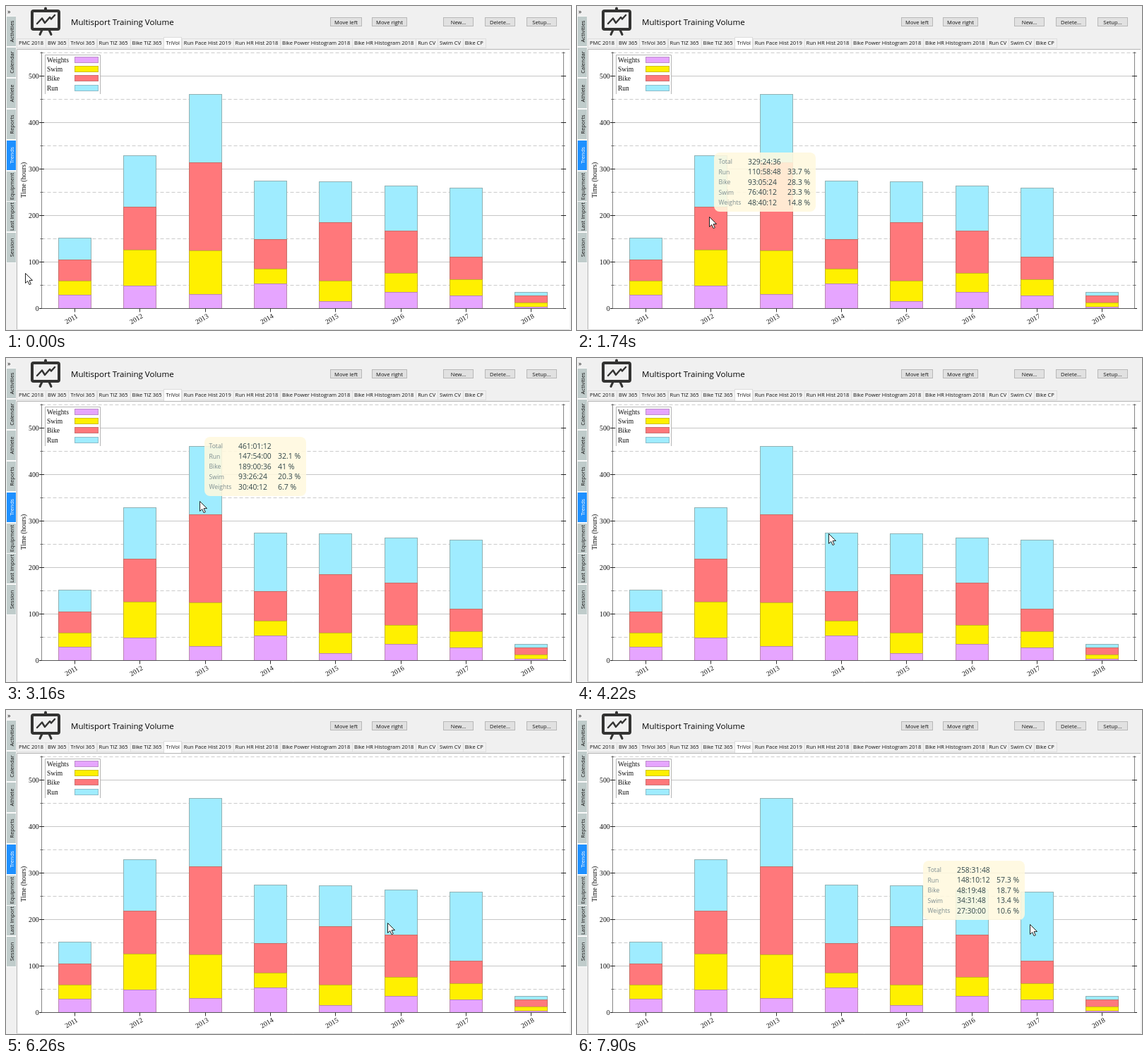
These frames come from a looping animation (800x460 px, 7.99 s). An HTML page with a canvas:

```html
<!DOCTYPE html>
<html lang="en">
<head>
<meta charset="utf-8">
<title>Training volume</title>
<style>
  html, body { margin: 0; width: 100%; height: 100%; overflow: hidden; background: #f0f0f0; }
  canvas { display: block; width: 800px; height: 460px; }
</style>
</head>
<body>
<canvas id="stage" width="800" height="460"></canvas>
<script>
const LOOP = 7990;
const STEP = 78; // the pointer is redrawn at this interval, in ms
const SANS = '"Open Sans", "Noto Sans", sans-serif';
const SERIF = '"Liberation Serif", serif';
const ctx = document.getElementById('stage').getContext('2d');

// Hours per year, in the order of SPORTS; bars and tooltips both come from these
const SPORTS = ['Run', 'Bike', 'Swim', 'Weights'];
const COLORS = ['#9fecff', '#ff787b', '#fff000', '#e6a5ff'];
const YEARS = [
  [47.09, 45.84, 30.33, 29.00],
  [110.98, 93.09, 76.67, 48.67],
  [147.90, 189.01, 93.44, 30.67],
  [125.06, 63.67, 31.75, 53.76],
  [88.17, 126.14, 43.68, 15.08],
  [96.81, 91.64, 40.59, 34.42],
  [148.17, 48.33, 34.53, 27.50],
  [7.1, 15.2, 8.3, 3.7]
];
const LEFT = 50.5, RIGHT = 789.5, BASE = 429.5, BAR = 46;
const sum = list => list.reduce((a, b) => a + b, 0);
const yOf = hours => BASE - hours * 0.66;
const rowOf = hours => Math.floor(yOf(hours));
const barX = i => 74 + i * 92.35;

// One glide per stop: start, end, where it stops, and how far it sags on the way
const START = { x: 27, y: 379 };
const GLIDES = [
  { start: 100, end: 800, x: 108, y: 378, sag: 12 },
  { start: 1230, end: 1740, x: 187, y: 299, sag: 0 },
  { start: 2200, end: 2990, x: 274, y: 203, sag: 0 },
  { start: 3300, end: 4080, x: 346, y: 239, sag: 0 },
  { start: 4160, end: 4530, x: 366, y: 250, sag: 6 },
  { start: 4910, end: 5690, x: 463, y: 275, sag: 9 },
  { start: 5930, end: 6720, x: 559, y: 294, sag: 12 },
  { start: 7260, end: 7900, x: 641, y: 304, sag: 3 }
];

// Glides settle early, so the ease ends before the sag does
function ease(p) {
  const q = Math.min(1, p * 1.7);
  return q * q * (3 - 2 * q);
}

// Pointer place, seen `lag` steps late
function pointerAt(t, lag) {
  const n = GLIDES.findLastIndex(g => t >= g.start);
  if (n < 0) return START;
  const from = GLIDES[n - 1] || START, to = GLIDES[n];
  const steps = Math.floor((t - to.start) / STEP + 0.25) + 0.7 - lag;
  const p = Math.min(1, steps * STEP / (to.end - to.start + STEP));
  const f = ease(p);
  return {
    x: Math.round(from.x + (to.x - from.x) * f),
    y: Math.round(from.y + (to.y - from.y) * f + to.sag * Math.sin(Math.PI * p) * (p < 0.9))
  };
}

function box(x, y, w, h, fill, stroke) {
  ctx.fillStyle = fill;
  ctx.fillRect(x, y, w, h);
  if (!stroke) return;
  ctx.strokeStyle = stroke;
  ctx.lineWidth = 1;
  ctx.strokeRect(x + 0.5, y + 0.5, w - 1, h - 1);
}

function line(points, color, width = 1) {
  ctx.strokeStyle = color;
  ctx.lineWidth = width;
  ctx.beginPath();
  points.forEach(([x, y]) => ctx.lineTo(x, y));
  ctx.stroke();
}

function widthOf(str, size) {
  ctx.font = `${size}px ${SANS}`;
  return ctx.measureText(str).width;
}

function text(str, x, y, size, { font = SANS, color = '#111', align = 'left', turn = 0 } = {}) {
  ctx.save();
  ctx.translate(x, y);
  ctx.rotate(turn);
  ctx.font = `${size}px ${font}`;
  ctx.fillStyle = color;
  ctx.textAlign = align;
  ctx.fillText(str, 0, 0);
  ctx.restore();
}

function drawIcon() {
  const ink = '#333332', mid = 56;
  ctx.save();
  ctx.lineJoin = ctx.lineCap = 'round';
  line([[mid, 3.5], [mid, 6]], ink, 4);
  for (const side of [-1, 1]) line([[mid + side * 5, 34], [mid + side * 8, 40.5]], ink, 3);
  line([[44, 25], [51, 17.5], [55, 24], [62, 16], [64, 18.5], [69, 13]], ink, 2.4);
  ctx.lineWidth = 4;
  ctx.beginPath();
  ctx.roundRect(mid - 19, 7, 38, 26, 2);
  ctx.stroke();
  ctx.restore();
}

function drawButtons(x, labels) {
  for (const label of labels) {
    const w = Math.round(Math.max(43, widthOf(label, 7.6) + 12));
    box(x, 16, w, 13, '#e1e1e1', '#b8b8b8');
    text(label, x + w / 2, 25.5, 7.6, { align: 'center' });
    x += 59;
  }
}

function drawHeader() {
  drawIcon();
  text('Multisport Training Volume', 92, 26.5, 11.55, { color: '#000' });
  drawButtons(459, ['Move left', 'Move right']);
  drawButtons(619, ['New...', 'Delete...', 'Setup...']);
}

function drawTabs() {
  const names = ['PMC 2018', 'BW 365', 'TriVol 365', 'Run TIZ 365', 'Bike TIZ 365', 'TriVol',
    'Run Pace Hist 2019', 'Run HR Hist 2018', 'Bike Power Histogram 2018',
    'Bike HR Histogram 2018', 'Run CV', 'Swim CV', 'Bike CP'];
  let x = 18;
  for (const name of names) {
    const w = widthOf(name, 7.5) + 5.86, left = Math.round(x) - 3;
    if (name === 'TriVol') box(left, 44, Math.round(w) + 1, 18, '#fff', '#dcdcdc');
    else box(left, 46, Math.round(w) + 1, 14, '#f0f0f0', '#dedede');
    text(name, x, 55, 7.5);
    x += w;
  }
}

function drawSidebar() {
  text('»', 2, 11, 9);
  const names = ['Activities', 'Calendar', 'Athlete', 'Reports', 'Trends', 'Equipment', 'Last Import', 'Session'];
  names.forEach((name, i) => {
    const y = Math.round(15 + i * 43.9), on = name === 'Trends';
    box(0, y - 1, 14, 44, '#fafafa');
    box(1, y, 13, 42, on ? '#1e90ff' : '#c0cccb');
    text(name, 10.5, y + 21, 7.5, { align: 'center', turn: -Math.PI / 2, color: on ? '#fff' : '#111' });
  });
}

function drawPanel() {
  box(15, 61, 783, 399, '#fff');
  line([[15.5, 460], [15.5, 61.5], [798, 61.5]], '#b4b4b4');
  line([[15, 459.5], [798, 459.5]], '#d8d8d8');
}

// Calls back for every 50 hours with its line and whether it is a main one
function eachLevel(first, fn) {
  for (let h = first; h <= 550; h += 50) fn(h, rowOf(h) + 0.5, h % 100 === 0);
}

function drawGrid() {
  eachLevel(50, (h, y, main) => {
    ctx.setLineDash(main ? [] : [5, 3]);
    line([[LEFT, y], [RIGHT, y]], main ? '#c6c6c6' : '#cbcbcb');
  });
  ctx.setLineDash([]);
}

function drawAxes() {
  for (const x of [LEFT, RIGHT]) {
    line([[x, 65], [x, BASE]], '#858585');
    eachLevel(0, (h, y, main) => {
      const r = main ? 3.5 : 2;
      line([[x - r, y], [x + r, y]], main ? '#222' : '#666');
      if (main && x === LEFT) text(h, 46.5, y + 3.5, 9.6, { font: SERIF, align: 'right' });
    });
  }
  line([[LEFT, BASE], [RIGHT, BASE]], '#555');
  YEARS.forEach((_, i) => {
    const x = Math.round(barX(i) + BAR / 2);
    line([[x + 0.5, BASE], [x + 0.5, BASE + 5]], '#333');
    text(2011 + i, x - 3, 447, 9.8, { font: SERIF, align: 'center', turn: -Math.PI / 6 });
  });
  text('Time (hours)', 28, 247, 9.7, { font: SERIF, align: 'center', turn: -Math.PI / 2 });
}

function drawBars() {
  YEARS.forEach((hours, i) => {
    let total = sum(hours);
    for (const [s, h] of hours.entries()) {
      const top = rowOf(total);
      total -= h;
      box(Math.round(barX(i)), top, BAR + 1, rowOf(total) - top + 1, COLORS[s], 'rgba(125, 95, 75, .42)');
    }
  });
}

function drawLegend() {
  box(55, 69, 79, 56, '#fff');
  line([[55.5, 125], [55.5, 69.5], [133.5, 69.5], [133.5, 125]], '#b5b5b5');
  SPORTS.forEach((name, s) => {
    const y = 72 + (3 - s) * 13.2;
    text(name, 58, y + 8, 9.5, { font: SERIF });
    box(97, Math.round(y), 34, 9, COLORS[s], 'rgba(110, 100, 100, .35)');
  });
}

function clock(hours) {
  const s = Math.round(hours * 3600), two = n => String(n).padStart(2, '0');
  return `${Math.floor(s / 3600)}:${two(Math.floor(s / 60) % 60)}:${two(s % 60)}`;
}

function drawTooltip(tip) {
  const hours = YEARS.find((list, i) =>
    tip.x >= barX(i) && tip.x <= barX(i) + BAR && tip.y >= yOf(sum(list)) && tip.y < BASE);
  if (!hours) return;
  const w = 144, total = sum(hours), y = tip.y - 91;
  const x = tip.x + 7 + w > RIGHT ? tip.x - 7 - w : tip.x + 7;
  ctx.fillStyle = 'rgba(255, 249, 222, .88)';
  ctx.beginPath();
  ctx.roundRect(x, y, w, 84, 8);
  ctx.fill();
  ['Total', ...SPORTS].forEach((name, i) => {
    const row = y + 16.7 + i * 14.5, value = i ? hours[i - 1] : total;
    text(name, x + 6.5, row - 0.5, 8.6, { color: '#7d8d90' });
    text(clock(value), x + 48, row, 10.3, { color: '#2f4548' });
    if (i) text(`${+(value / total * 100).toFixed(1)} %`, x + 104, row, 10.5, { color: '#2f4548' });
  });
}

function drawPointer({ x, y }) {
  ctx.save();
  ctx.translate(x + 0.5, y + 0.5);
  ctx.lineJoin = 'round';
  ctx.strokeStyle = '#222';
  ctx.fillStyle = '#fff';
  ctx.lineWidth = 1;
  const arrow = new Path2D('M0 0V14L3.2 11L5.6 16.2L7.8 15.2L5.5 10.2L10 10Z');
  ctx.fill(arrow);
  ctx.stroke(arrow);
  ctx.restore();
}

function draw(t) {
  box(0, 0, 800, 460, '#f0f0f0');
  drawHeader();
  drawTabs();
  drawSidebar();
  drawPanel();
  drawGrid();
  drawBars();
  drawAxes();
  drawLegend();
  drawTooltip(pointerAt(t, 0.6));
  drawPointer(pointerAt(t, 0));
}

const began = performance.now();
function tick() {
  draw((performance.now() - began) % LOOP);
  requestAnimationFrame(tick);
}
tick();
</script>
</body>
</html>
```
